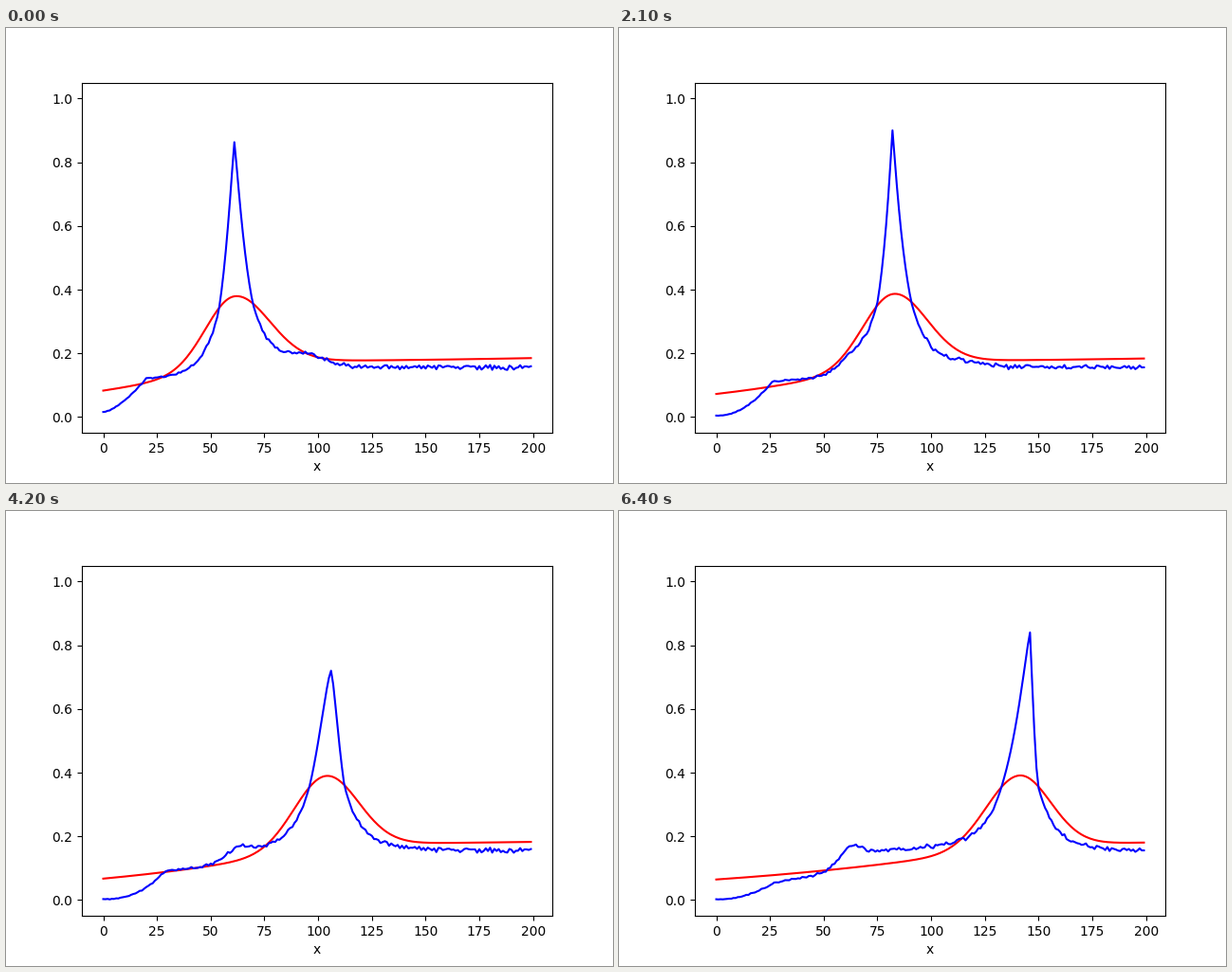
A matplotlib script that plays this animation: 640x480 px, repeating every 6.5 s.

```python
import numpy as np
import matplotlib.pyplot as plt
from matplotlib.animation import FuncAnimation

FRAMES, STEP = 65, 100
LAST = FRAMES - 1
EDGE, SHOULDER = 8, .2   # half-width of the core and its height at the edge
x = np.arange(200)

rng = np.random.default_rng(4)
steady, drift_a, drift_b = rng.uniform(-1, 1, (3, x.size))


def sigmoid(v):
    return 1 / (1 + np.exp(-v))


def bell(v):
    return np.exp(-v ** 2 / 2)


def centre(t):
    return np.interp(t, [0, 42, 56, LAST], [61, 103.6, 118, 141])


def smooth_curve(t):
    c = centre(t)
    start = .062 + .021 * np.exp(-t / 30)
    peak = .392 - .013 * np.exp(-t / 25)
    mid = .176 + .003 * t / LAST
    end = .185 - .00006 * t
    low = start * (mid / start) ** (x / c)
    high = mid + (end - mid) * np.clip((x - c) / (199 - c), 0, 1) ** 2
    base = (low ** -8 + high ** -8) ** (-1 / 8)
    width = np.where(x < c, 13.4 + .03 * t, 16 - .025 * t)
    return base + (peak - mid * 2 ** (-1 / 8)) * bell((x - c) / width)


def rough_base(t, c):
    """Foot, first plateau, second step and the level right of the peak."""
    age = t / LAST
    wave = np.sin(np.pi * t / 88)
    foot_end = 20 + 8.8 * wave
    start = .002 + .013 * np.exp(-t / 12)
    plateau = .118 - .064 * age ** 2
    foot = np.minimum(x / foot_end, 1) ** (1.5 + .9 * wave)
    first = start + (plateau - start) * foot
    first += .0012 * age * np.maximum(x - foot_end, 0)
    second = .156 + .0004 * np.maximum(x - 75, 0) * sigmoid((c - x) / 5)
    second += .02 * age * bell((x - 64) / 3)
    second += .035 * np.exp(-t / 20) * bell((x - c - 33) / 9)
    return first + (second - first) * sigmoid((x - 56) / 2.5)


def rough_curve(t):
    c = centre(t) + .6
    base = rough_base(t, c)
    height = np.interp(t, [0, 14, 21, 29, 42, 48, 56, LAST],
                       [.863, 1, .9, .763, .72, .8, .843, .84])
    lean = np.interp(t, [0, 29, 42, 56, LAST], [-.4, -1, 2, -1, 4.5])
    tip = int(round(c + lean))
    amp = height - base[tip]

    # The crest leans to and fro between fixed edges of the core
    side = np.where(x < tip, tip - c + EDGE, c + EDGE - tip)
    u = np.minimum(np.abs(x - tip) / side, 1)
    core = SHOULDER * (amp / SHOULDER) ** (1 - u ** (2.7 - 1.8 * height))
    y = base + core * np.exp(-np.maximum(np.abs(x - c) - EDGE, 0) / 8)

    phase = 2 * np.pi * t / 40
    noise = steady + .6 * (drift_a * np.cos(phase) + drift_b * np.sin(phase))
    return y + (.0005 + .005 * np.minimum(x / 90, 1)) * noise * (y < .3)


fig, ax = plt.subplots(figsize=(6.4, 4.8), dpi=100)
red, = ax.plot(x, smooth_curve(0), color="red")
blue, = ax.plot(x, rough_curve(0), color="blue")
ax.set_xlim(-9.95, 208.95)
ax.set_ylim(-.05, 1.05)
ax.set_xlabel("x")


def update(t):
    red.set_ydata(smooth_curve(t))
    blue.set_ydata(rough_curve(t))
    return red, blue


anim = FuncAnimation(fig, update, frames=FRAMES, interval=STEP, repeat=True,
                     repeat_delay=0)
plt.show()
```
